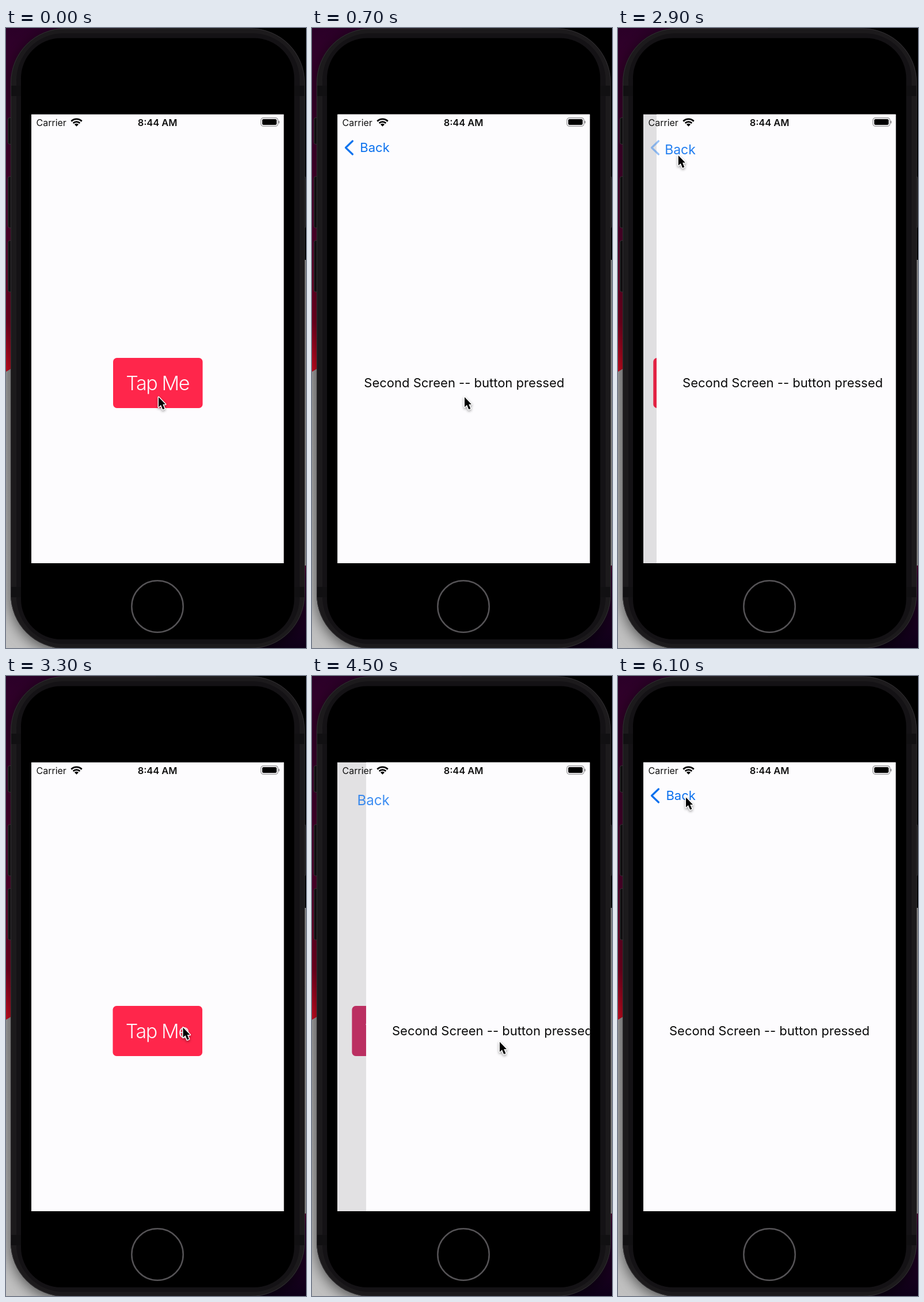
These frames come from a looping animation (521x1075 px, 6200 ms). An HTML page with a canvas:

```html
<!DOCTYPE html>
<html lang="en">
<head>
<meta charset="utf-8">
<title>Tap Me</title>
<style>
html, body { margin: 0; width: 100%; height: 100%; overflow: hidden; background: #000; }
canvas { display: block; width: 521px; height: 1075px; }
</style>
</head>
<body>
<canvas id="stage" width="521" height="1075"></canvas>
<script>
const W = 521, H = 1075, LOOP = 6200, STEP = 100;
const SCREEN = { x: 44, y: 149.5, w: 438.5, h: 778.5 };
const PAPER = '#fdfcfe';
const FONT = 'Inter, Roboto, sans-serif';
const ctx = document.getElementById('stage').getContext('2d');

const clamp = v => Math.max(0, Math.min(1, v));
const smooth = v => { v = clamp(v); return v * v * (3 - 2 * v); };

// Critically damped spring: what is left of the way after ms
function spring(ms) {
  const s = 0.01826 * Math.max(0, ms);
  return (1 + s) * Math.exp(-s);
}

const PUSH_A = 260, POP = 2880, PUSH_B = 4296;

// 1 = second screen fully off to the right, 0 = in place
function slideAt(t) {
  if (t < POP) return spring(t - PUSH_A);
  if (t < PUSH_B) return 1 - spring(t - POP);
  return spring(t - PUSH_B);
}

function pressAt(t) {
  const pulse = (down, up) => smooth((t - down) / 350) - smooth((t - up) / 350);
  return clamp(pulse(40, 180) + pulse(4080, 4245));
}

const pointerKeys = [
  [0, 265, 640], [1450, 265, 640], [2250, 103.5, 218.5], [2880, 103.5, 218.5],
  [3300, 307.5, 609.5], [3600, 309, 612], [4200, 326, 634.5],
  [5530, 326, 634.5], [6100, 118, 210.5], [LOOP, 118, 210.5]
];

function pointerAt(t) {
  const i = pointerKeys.findIndex(k => k[0] > t);
  const [t0, x0, y0] = pointerKeys[i - 1], [t1, x1, y1] = pointerKeys[i];
  const u = smooth((t - t0) / (t1 - t0));
  return [x0 + (x1 - x0) * u, y0 + (y1 - y0) * u];
}

function box(c, x, y, w, h, r, fill, stroke, lw = 1) {
  c.beginPath();
  c.roundRect(x, y, w, h, r);
  if (fill) { c.fillStyle = fill; c.fill(); }
  if (stroke) { c.strokeStyle = stroke; c.lineWidth = lw; c.stroke(); }
}

function label(str, x, y, size, color, { weight = 400, align = 'left', track = 0 } = {}) {
  ctx.font = `${weight} ${size}px ${FONT}`;
  ctx.textAlign = align;
  ctx.letterSpacing = track + 'px';
  ctx.fillStyle = color;
  ctx.fillText(str, x, y);
}

function gradient(c, y0, y1, stops) {
  const g = c.createLinearGradient(0, y0, 0, y1);
  stops.forEach(([at, color]) => g.addColorStop(at, color));
  return g;
}

function drawDesktop(c) {
  c.fillStyle = gradient(c, 0, 600, [
    [0, '#2b0028'], [0.3, '#42002f'], [0.62, '#5a0030'], [0.85, '#820022'], [0.98, '#d20c22']
  ]);
  c.fillRect(0, 0, 260, 600);
  c.fillStyle = gradient(c, 590, H, [[0, '#a6a6a6'], [1, '#c2c2c2']]);
  c.beginPath();
  c.moveTo(0, 596);
  c.lineTo(10, 590);
  c.lineTo(260, 590);
  c.lineTo(260, H);
  c.lineTo(0, H);
  c.fill();
  c.fillStyle = '#000';
  c.fillRect(260, 0, 261, 402);
  c.fillStyle = '#b0b0b0';
  c.fillRect(260, 402, 261, 530);
  c.fillStyle = gradient(c, 932, H, [[0, '#5a0036'], [0.15, '#300030'], [1, '#0e0018']]);
  c.fillRect(260, 932, 261, H - 932);
}

function drawPhone(c) {
  // side keys
  [[155, 46], [257, 89], [368, 89]].forEach(([y, h]) => box(c, 3.5, y + 0.5, 12, h, 3, '#161416', '#454345'));
  box(c, 508, 257.5, 12.5, 89, 3, '#161416', '#454345');

  c.save();
  c.shadowColor = 'rgba(0,0,0,0.6)';
  c.shadowBlur = 24;
  c.shadowOffsetY = 6;
  box(c, 8, 0.5, 511, 1075.5, 94, '#1c1a1c');
  c.restore();
  box(c, 8.5, 1, 510, 1074.5, 94, null, '#302e31');
  box(c, 18, 9, 492, 1059, 82, '#141215');
  c.fillStyle = '#111012';
  for (const y of [100, 969]) {
    c.fillRect(9, y, 17, 18);
    c.fillRect(501, y, 17, 18);
  }
  box(c, 26, 17.5, 474.5, 1042.5, 70, '#000');

  c.beginPath();
  c.arc(263, 1003, 44.7, 0, 7);
  c.strokeStyle = '#555356';
  c.lineWidth = 2.5;
  c.stroke();
}

const backdrop = document.createElement('canvas');
backdrop.width = W;
backdrop.height = H;
drawDesktop(backdrop.getContext('2d'));
drawPhone(backdrop.getContext('2d'));

function drawStatusBar() {
  label('Carrier', 52.5, 169.5, 16, '#111');
  label('8:44 AM', 263, 169.5, 16.4, '#111', { weight: 600, align: 'center' });

  const cx = 122.5, cy = 170.8, a = Math.PI / 4;
  ctx.strokeStyle = ctx.fillStyle = '#000';
  ctx.lineWidth = 2.9;
  for (const r of [12.9, 8.2]) {
    ctx.beginPath();
    ctx.arc(cx, cy, r, -Math.PI / 2 - a, -Math.PI / 2 + a);
    ctx.stroke();
  }
  ctx.beginPath();
  ctx.moveTo(cx, cy);
  ctx.arc(cx, cy, 5, -Math.PI / 2 - a, -Math.PI / 2 + a);
  ctx.fill();

  box(ctx, 442.8, 155.8, 29.4, 14.4, 4, null, '#8c8b8d', 1.2);
  box(ctx, 445, 158, 25, 10, 2.2, '#000');
  box(ctx, 473.3, 160.8, 1.7, 4.6, 1, '#8c8b8d');
}

function drawFirst(slide, press) {
  const mix = (a, b) => Math.round(a + (b - a) * press);
  ctx.save();
  ctx.translate(-131.6 * (1 - slide), 0);
  box(ctx, 186, 572, 155.5, 87, 6.5, `rgb(${mix(255, 0)},${mix(38, 118)},${mix(75, 255)})`);
  label('Tap Me', 263.2, 628.3, 34, '#fdf6fa', { weight: 300, align: 'center', track: -1.4 });
  ctx.restore();
  ctx.fillStyle = `rgba(0,0,0,${0.118 * (1 - slide)})`;
  ctx.fillRect(SCREEN.x, SCREEN.y, SCREEN.w, SCREEN.h);
}

function drawSecond(slide) {
  const dx = SCREEN.w * slide;
  ctx.fillStyle = PAPER;
  ctx.fillRect(SCREEN.x + dx, SCREEN.y, SCREEN.w, SCREEN.h);
  label('Second Screen -- button pressed', 263 + dx, 623.3, 22, '#0a0a0a', { align: 'center' });
}

function drawBack(slide) {
  const blue = '#0a70ee', scale = 1 + 0.85 * slide;
  ctx.globalAlpha = clamp(1 - 1.85 * slide);
  label('Back', 134.8, 207 + 68 * slide + 8.2 * scale, 22 * scale, blue, { align: 'right' });

  ctx.globalAlpha = clamp(1 - slide / 0.09);
  ctx.strokeStyle = blue;
  ctx.lineWidth = 3.2;
  ctx.lineCap = ctx.lineJoin = 'round';
  ctx.beginPath();
  ctx.moveTo(70.5, 196);
  ctx.lineTo(58.5, 207.5);
  ctx.lineTo(70.5, 219);
  ctx.stroke();
  ctx.lineCap = 'butt';
  ctx.lineJoin = 'miter';
  ctx.globalAlpha = 1;
}

const arrow = new Path2D('M0 0V17.2L4 13.6L7.2 21.3L10.4 19.9L7.2 12.5H12Z');

function drawPointer(x, y) {
  ctx.save();
  ctx.translate(x, y);
  ctx.lineJoin = 'round';
  ctx.lineWidth = 3;
  ctx.strokeStyle = '#fff';
  ctx.shadowColor = 'rgba(0,0,0,0.4)';
  ctx.shadowBlur = 4;
  ctx.shadowOffsetY = 2;
  ctx.stroke(arrow);
  ctx.shadowColor = 'transparent';
  ctx.fillStyle = '#000';
  ctx.fill(arrow);
  ctx.restore();
}

function render(t) {
  const slide = slideAt(t);
  ctx.drawImage(backdrop, 0, 0);
  ctx.save();
  ctx.beginPath();
  ctx.rect(SCREEN.x, SCREEN.y, SCREEN.w, SCREEN.h);
  ctx.clip();
  ctx.fillStyle = PAPER;
  ctx.fill();
  drawFirst(slide, pressAt(t));
  drawSecond(slide);
  drawBack(slide);
  drawStatusBar();
  ctx.restore();
  drawPointer(...pointerAt(t));
}

const start = performance.now();
function tick() {
  const t = (performance.now() - start) % LOOP;
  render(Math.floor(t / STEP) * STEP);
  requestAnimationFrame(tick);
}
tick();
</script>
</body>
</html>
```
